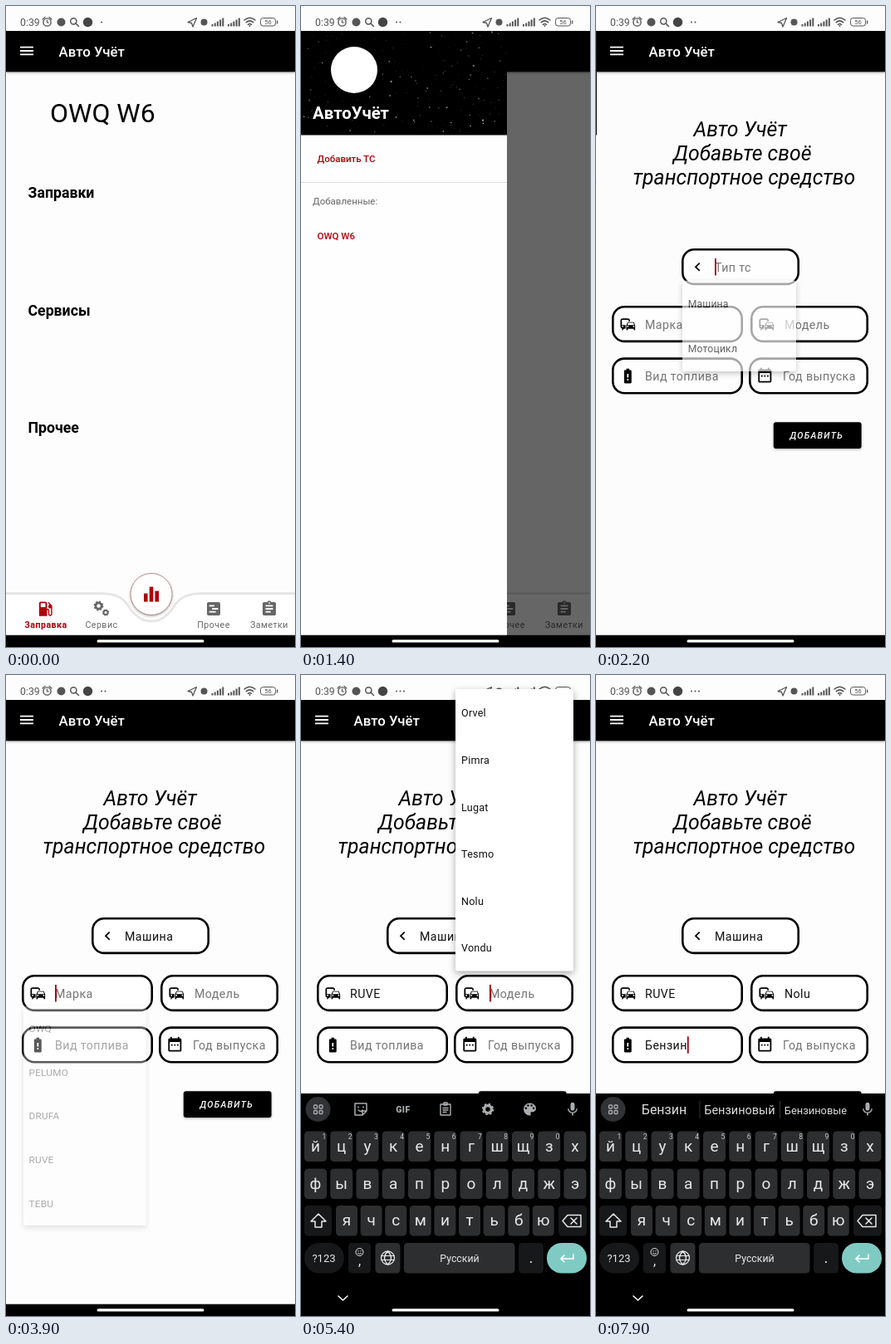
Write an HTML page that moves like this. It is 348 by 772 pixels and loops after 8 s.

```html
<!DOCTYPE html>
<html lang="ru">
<head>
<meta charset="utf-8">
<title>Авто Учёт</title>
<style>
  html, body { margin: 0; height: 100%; overflow: hidden; background: #fdfdfd; }
  svg { display: block; width: 100%; height: 100%; font-family: Roboto, sans-serif; }
  text { white-space: pre; }
  .line { fill: none; stroke-linecap: round; stroke-linejoin: round; }
  .popup { filter: drop-shadow(0 3px 4px #0005); }
  .raised { filter: drop-shadow(0 1px 1.5px #0005); }
</style>
</head>
<body>
<svg id="stage" viewBox="0 0 348 772"></svg>
<script>
const LOOP = 8000, STEP = 100, RED = '#b00009', GREY = '#666';
const CAR = 'OWQ W6', BRAND = 'RUVE', MODEL = 'Nolu', ROW = 56.6;

const ICONS = {
  menu: 'M3 18h18v-2H3zM3 13h18v-2H3zM3 6v2h18V6z',
  fuel: 'M19.77 7.23l-3.71-3.73L15 4.56l2.11 2.11c-.94.36-1.61 1.26-1.61 2.33 0 1.38 1.12 2.5 2.5 2.5.36 0 .69-.08 1-.21v7.21c0 .55-.45 1-1 1s-1-.45-1-1V14c0-1.1-.9-2-2-2h-1V5c0-1.1-.9-2-2-2H6c-1.1 0-2 .9-2 2v16h10v-7.5h1.5v5c0 1.38 1.12 2.5 2.5 2.5s2.5-1.12 2.5-2.5V9c0-.69-.28-1.32-.73-1.77zM12 10H6V5h6z',
  note: 'M5 3h14a2 2 0 0 1 2 2v14a2 2 0 0 1-2 2H5a2 2 0 0 1-2-2V5a2 2 0 0 1 2-2zM6 7v2h7V7zM10 11v2h8v-2zM6 15v2h9v-2z',
  clipboard: 'M19 3h-4.18C14.4 1.84 13.3 1 12 1s-2.4.84-2.82 2H5c-1.1 0-2 .9-2 2v14c0 1.1.9 2 2 2h14c1.1 0 2-.9 2-2V5c0-1.1-.9-2-2-2zm-7 0c.55 0 1 .45 1 1s-.45 1-1 1-1-.45-1-1 .45-1 1-1zm2 14H7v-2h7zm3-4H7v-2h10zm0-4H7V7h10z',
  back: 'M15.41 7.41L14 6l-6 6 6 6 1.41-1.41L10.83 12z',
  commute: 'M12 4H5C3.34 4 2 5.34 2 7v8c0 1.66 1.34 3 3 3l-1 1v1h1l2-2.03L9 18v-5H4V5.98L13 6v2h2V7c0-1.66-1.34-3-3-3zM5 14c.55 0 1 .45 1 1s-.45 1-1 1-1-.45-1-1 .45-1 1-1zm15.57-4.34c-.14-.4-.52-.66-.97-.66h-7.19c-.46 0-.83.26-.98.66L10 13.77l.01 5.51c0 .38.31.72.69.72h.62c.38 0 .68-.38.68-.76V18h8v1.24c0 .38.31.76.69.76h.61c.38 0 .69-.34.69-.72l.01-5.51zM12.41 10h7.19l1.03 3h-9.25zM12 16c-.55 0-1-.45-1-1s.45-1 1-1 1 .45 1 1-.45 1-1 1zm8 0c-.55 0-1-.45-1-1s.45-1 1-1 1 .45 1 1-.45 1-1 1z',
  battery: 'M15.67 4H14V2h-4v2H8.33C7.6 4 7 4.6 7 5.33v15.33C7 21.4 7.6 22 8.33 22h7.33c.74 0 1.34-.6 1.34-1.33V5.33C17 4.6 16.4 4 15.67 4zM13 18h-2v-2h2zm0-4h-2V9h2z',
  calendar: 'M19 3h-1V1h-2v2H8V1H6v2H5c-1.11 0-2 .9-2 2v14c0 1.1.89 2 2 2h14c1.1 0 2-.9 2-2V5c0-1.1-.9-2-2-2zm0 16H5V8h14zM9 11H7v2h2zM13 11h-2v2h2zM17 11h-2v2h2z',
  mic: 'M12 14c1.66 0 3-1.34 3-3V5c0-1.66-1.34-3-3-3S9 3.34 9 5v6c0 1.66 1.34 3 3 3zm5.3-3c0 3-2.54 5.1-5.3 5.1S6.7 14 6.7 11H5c0 3.41 2.72 6.23 6 6.72V21h2v-3.28c3.28-.48 6-3.3 6-6.72z',
  palette: 'M12 3a9 9 0 0 0 0 18c.83 0 1.5-.67 1.5-1.5 0-1-.9-1.3-.4-2.3.2-.7.8-1.2 1.4-1.2H16a5 5 0 0 0 5-5c0-4.4-4-8-9-8zM5 10.5a1.5 1.5 0 1 1 3 0 1.5 1.5 0 1 1-3 0zM8 6.5a1.5 1.5 0 1 1 3 0 1.5 1.5 0 1 1-3 0zM13 6.5a1.5 1.5 0 1 1 3 0 1.5 1.5 0 1 1-3 0zM16 10.5a1.5 1.5 0 1 1 3 0 1.5 1.5 0 1 1-3 0z'
};

const text = (x, y, size, str, attrs = '') => `<text x="${x}" y="${y}" font-size="${size}" ${attrs}>${str}</text>`;
const middle = (x, y, size, str, attrs = '') => text(x, y, size, str, `text-anchor="middle" ${attrs}`);
const rect = (x, y, w, h, fill, rx = 0, attrs = '') =>
  `<rect x="${x}" y="${y}" width="${w}" height="${h}" rx="${rx}" fill="${fill}" ${attrs}/>`;
const dot = (x, y, r, fill, attrs = '') => `<circle cx="${x}" cy="${y}" r="${r}" fill="${fill}" ${attrs}/>`;
const line = (d, color, width = 1.5) => `<path class="line" d="${d}" stroke="${color}" stroke-width="${width}"/>`;
const group = (id, body, attrs = '') => `<g id="${id}" ${attrs}>${body}</g>`;
const icon = (name, cx, cy, fill = '#000', size = 21.3) =>
  `<path transform="translate(${cx - size / 2} ${cy - size / 2}) scale(${size / 24})" fill="${fill}" fill-rule="evenodd" d="${ICONS[name]}"/>`;
const gear = (x, y, r, color) => {
  const teeth = r * 1.4;
  return dot(x, y, r, 'none', `stroke="${color}" stroke-width="${r * .75}"`) +
    dot(x, y, teeth, 'none', `stroke="${color}" stroke-width="${r * .5}" stroke-dasharray="${teeth * Math.PI / 8}"`);
};

function statusBar() {
  const ink = '#555';
  const signal = x => [2.5, 4, 6, 8, 10].map((h, i) => rect(x + i * 3.2, 24.5 - h, 2, h, ink)).join('');
  return rect(0, 0, 348, 30, '#fdfdfd') + text(17, 24, 12.3, '0:39', `fill="${ink}"`) +
    dot(49.5, 19.5, 4.6, 'none', `stroke="${ink}" stroke-width="1.4"`) +
    line('M49.5 17v3h2M44 16l3-2.5M55 16l-3-2.5', ink, 1.2) +
    dot(66.5, 19.5, 5, ink) +
    dot(81.3, 18.3, 3.6, 'none', `stroke="${ink}" stroke-width="1.5"`) + line('M84 21l3.5 3.5', ink) +
    dot(98.5, 19.5, 5.7, '#444') +
    [115, 119.5, 124].map((x, i) => dot(x, 19.5, 1, ink, `id="notice${i}"`)).join('') +
    line('M219 19.5L229.5 14.5 225 25 223.5 20.5z', ink, 1.3) +
    dot(238.5, 19.5, 4, ink) + signal(247.5) + signal(267) +
    line('M287 17q6.5-5.5 13 0M289.3 19.7q4.2-3.5 8.4 0M291.5 22.3q2-1.6 4 0', ink, 1.6) + dot(293.5, 24, 1, ink) +
    rect(306.5, 14.5, 18, 9.5, 'none', 3, `stroke="${ink}"`) + rect(326, 17.5, 1.3, 4, ink) +
    middle(315.5, 22.2, 7.5, '56', `fill="${ink}"`);
}

function homePage() {
  const heading = (y, str) => text(26.5, y, 17.7, str, 'font-weight="700"');
  const label = (x, str, attrs = `fill="${GREY}"`) => middle(x, 749, 10.6, str, `letter-spacing=".5" ${attrs}`);
  return rect(0, 30, 348, 728, '#fdfdfd') + text(53, 140, 32, CAR) +
    heading(231.2, 'Заправки') + heading(372.7, 'Сервисы') + heading(514.2, 'Прочее') +
    '<path d="M-9 707.5H112C132 707.5 140 712 147 722 155 735 164 741 175 741S195 735 203 722C210 712 218 707.5 238 707.5H357V770H-9z" fill="#fff" stroke="#e6e6e6" stroke-width="3"/>' +
    dot(175, 708.4, 25, '#fff', 'class="raised" stroke="#a66" stroke-width=".7"') +
    rect(166, 707.5, 4.6, 10, RED) + rect(172.7, 699.5, 4.6, 18, RED) + rect(179.4, 704.5, 4.6, 13, RED) +
    icon('fuel', 47.5, 726, RED, 23) + label(48, 'Заправка', `fill="${RED}" font-weight="700"`) +
    gear(111.5, 722.5, 3.6, GREY) + gear(120, 730.5, 2.5, GREY) + label(115, 'Сервис') +
    icon('note', 250, 726, GREY) + label(250, 'Прочее') +
    icon('clipboard', 317, 726, GREY) + label(317, 'Заметки');
}

const FIELDS = [
  { x: 103, y: 292, w: 142, icon: 'back', textX: 143, hint: 'Тип тс', value: 'Машина', at: 3100 },
  { x: 19, y: 361, w: 158, icon: 'commute', textX: 59, hint: 'Марка', value: BRAND, at: 4800 },
  { x: 186, y: 361, w: 142, icon: 'commute', textX: 227, hint: 'Модель', value: MODEL, at: 5800 },
  { x: 19, y: 423.3, w: 158, icon: 'battery', textX: 59, hint: 'Вид топлива', value: 'Бензин', at: 7800 },
  { x: 184, y: 423.3, w: 144, icon: 'calendar', textX: 225, hint: 'Год выпуска', at: Infinity }
];

// Field index and the span in which its caret is visible.
const CARETS = [
  [0, 2100, 2600], [0, 3100, 3500], [1, 3800, 4700], [1, 4800, 5100], [2, 5200, 5700],
  [2, 5800, 6400], [3, 6500, 6900], [3, 7400, 8000]
];

const BRANDS = ['OWQ', 'PELUMO', 'DRUFA', BRAND, 'TEBU'];
const POPUPS = [
  { x: 103, y: 330.7, w: 142, items: ['Машина', 'Мотоцикл'], open: 2070, close: 3000 },
  { x: 19, y: 398.5, w: 158, items: BRANDS, open: 3830, close: 4100 },
  { x: 19, y: 73, w: 158, items: BRANDS, open: 4180, close: 4700, up: true },
  { x: 186, y: 17, w: 142, items: ['Orvel', 'Pimra', 'Lugat', 'Tesmo', MODEL, 'Vondu'], open: 5100, close: 5750, up: true },
  { x: 19, y: 135, w: 158, items: ['Бензин', 'Дизель', 'Газ', 'Электро', 'Гибрид'], open: 6450, close: 7700, up: true }
];

function formPage() {
  const title = (x, y, str) => text(x, y, 24.8, str, 'font-style="italic"');
  const field = (f, i) =>
    rect(f.x + 1.3, f.y + 1.3, f.w - 2.6, 41.6, '#fff', 14, 'stroke="#000" stroke-width="2.6"') +
    icon(f.icon, f.x + 19.3, f.y + 22.3) +
    text(f.textX, f.y + 27.7, 14.2, f.hint, `id="field${i}" letter-spacing=".44"`);
  return rect(0, 30, 348, 728, '#fdfdfd') +
    title(117.5, 157.4, 'Авто Учёт') + title(93, 186.4, 'Добавьте своё') + title(44.5, 215.4, 'транспортное средство') +
    FIELDS.map(field).join('') + rect(0, 0, 1.8, 20.5, '#a0000c', 0, 'id="caret"') +
    rect(213.8, 501.3, 105.8, 31.8, '#000', 3, 'class="raised"') +
    text(233.5, 521.3, 10.6, 'ДОБАВИТЬ', 'fill="#fff" font-weight="500" font-style="italic" letter-spacing="1.25"');
}

function drawer() {
  let seed = 7;
  const random = () => (seed = seed * 16807 % 2147483647) / 2147483647;
  const specks = Array.from({ length: 230 }, () =>
    dot(random() * 248, 30 + random() * 125, .3 + random() ** 4 * .9, '#fff', `opacity="${.15 + random() * .45}"`)).join('');
  const link = (y, str) => text(19.5, y, 11.5, str, `fill="${RED}" font-weight="500"`);
  return rect(0, 30, 248, 728, '#fefefe') + rect(0, 30, 248, 125.5, '#000') + specks +
    dot(64, 77, 28, '#fff') +
    text(14, 136, 20.4, 'АвтоУчёт', 'fill="#fff" font-weight="700"') +
    link(188.3, 'Добавить ТС') + rect(0, 212, 248, 1, '#ddd') +
    text(14, 239, 11.5, 'Добавленные:', `fill="${GREY}"`) + link(281.3, CAR);
}

function popup(p, i) {
  const item = (str, n) =>
    text(p.x + 7, p.y + ROW * (n + .5) + 5, 12.6, str, 'fill="#111" letter-spacing=".22"');
  return group('popup' + i, rect(p.x, p.y, p.w, p.items.length * ROW, '#fff', 2) + p.items.map(item).join(''), 'class="popup"');
}

function keyboard() {
  const KEY = '#2d2e30', DARK = '#17181a', INK = '#e8e8e8', TOOL = '#aaadb0';
  const key = (x, y, w, label = '', fill = KEY) =>
    rect(x, y, w, 36.5, fill, 4.5) + middle(x + w / 2, y + 24, 19, label, `fill="${INK}"`);
  const row = (letters, x, y, pitch, w) => [...letters].map((c, i) => key(x + i * pitch, y, w, c)).join('');
  const digits = [...'1234567890'].map((d, i) => middle(28 + i * 31.25, 559, 8.5, d, 'fill="#ccc"')).join('');
  const grid = [15.5, 22].map(x => [518, 524.5].map(y =>
    rect(x, y, 4, 4, 'none', 1, `stroke="${TOOL}" stroke-width="1.3"`)).join('')).join('');
  const tools = line('M65 516h14v9l-5 5H65zM79 525h-5v5M69 520v1M75 520v1M69 524q3 3 5 0', TOOL) +
    middle(123, 527, 10.5, 'GIF', `fill="${TOOL}" font-weight="900" letter-spacing=".5"`) +
    line('M168 517h12v13h-12zM172 515h4v3h-4zM171 521.5h6M171 524h6M171 526.5h4', TOOL, 1.4) +
    gear(225, 523, 4.4, TOOL) + icon('palette', 275.5, 523, TOOL, 20);
  const hints = middle(82, 529, 16, 'Бензин', 'fill="#ddd"') + middle(173, 529, 14.5, 'Бензиновый', 'fill="#ddd"') +
    middle(264.5, 529, 12.9, 'Бензиновые', 'fill="#ddd"') + rect(124.5, 513, 1, 21, '#333') + rect(221, 513, 1, 21, '#333');
  return rect(0, 504, 348, 268, '#000') + dot(20.5, 523, 15, '#303235') + grid +
    group('tools', tools) + group('hints', hints) + icon('mic', 327, 523, TOOL, 20) +
    row('йцукенгшщзх', 4, 549.5, 31.25, 27) + digits +
    row('фывапролджэ', 4, 594.5, 31.25, 27) +
    key(4, 639, 33, '', DARK) + line('M21 649l-9 9h5v7h8v-7h5z', INK) +
    row('ячсмитьбю', 42, 639, 29.6, 26) +
    key(310, 639, 34, '', DARK) + line('M315 657.5l6-7h16v14h-16zM325 654l7 7M332 654l-7 7', INK) +
    rect(4, 684, 48, 36.5, DARK, 18) + middle(27.5, 706.5, 13, '?123', `fill="${INK}"`) +
    key(57, 684, 27, '', DARK) + dot(70.5, 695, 4.5, 'none', `stroke="${INK}"`) +
    line('M69 693.5v.5M72 693.5v.5M68.5 696.5q2 2 4 0', INK, 1) + middle(70.5, 711, 16, ',', `fill="${INK}"`) +
    key(89.5, 684, 30) + dot(104.5, 702, 8, 'none', `stroke="${INK}" stroke-width="1.3"`) +
    line('M104.5 694q-8 8 0 16q8-8 0-16M97 699.5h15M97 704.5h15', INK, 1.2) +
    key(124, 684, 133.5) + middle(191, 706.5, 12.3, 'Русский', `fill="${INK}"`) +
    key(262, 684, 30, '.', DARK) +
    rect(296, 684, 48, 36.5, '#7fcbc4', 18) + line('M328 698v5h-15M317 699l-4 4 4 4', '#fff', 1.7) +
    line('M45 748l5.5 5 5.5-5', '#fff', 1.6);
}

const stage = document.getElementById('stage');
stage.innerHTML =
  group('home', homePage()) + group('form', formPage()) +
  rect(0, 30, 348, 49.3, '#000', 0, 'class="raised"') + icon('menu', 25, 54, '#fff') +
  text(63.5, 61.1, 16.8, 'Авто Учёт', 'fill="#fff" font-weight="500"') +
  rect(0, 30, 348, 728, '#000', 0, 'id="scrim"') + group('drawer', drawer()) +
  statusBar() + rect(0, 757.7, 348, 15, '#000') +
  POPUPS.map(popup).join('') + group('keyboard', keyboard()) +
  rect(109.5, 763.3, 129, 3.2, '#fff', 1.6);

const el = id => document.getElementById(id);
const show = (id, on) => el(id).setAttribute('visibility', on ? 'visible' : 'hidden');
const ramp = (t, from, span) => Math.max(0, Math.min(1, (t - from) / span));
const easeOut = (t, from, span) => 1 - (1 - ramp(t, from, span)) ** 3;

function draw(t) {
  const formOpen = t >= 2000;
  show('home', !formOpen);
  show('form', formOpen);

  const slide = easeOut(t, 870, 500) * (1 - easeOut(t, 1870, 390));
  el('drawer').setAttribute('transform', `translate(${-248 * (1 - slide)} 0)`);
  show('drawer', slide > 0);
  el('scrim').setAttribute('opacity', .6 * slide);

  show('notice1', t >= 100);
  show('notice2', t >= 4300);

  FIELDS.forEach((f, i) => {
    const filled = t >= f.at, label = el('field' + i);
    label.textContent = filled ? f.value : f.hint;
    label.setAttribute('fill', filled ? '#111' : '#757575');
  });
  const caret = CARETS.find(([, from, to]) => t >= from && t < to);
  show('caret', caret);
  if (caret) {
    const i = caret[0], f = FIELDS[i];
    const width = t >= f.at ? el('field' + i).getComputedTextLength() : 0;
    el('caret').setAttribute('transform', `translate(${f.textX + width} ${f.y + 12})`);
  }

  POPUPS.forEach((p, i) => {
    const grow = ramp(t, p.open, 200), alpha = grow * (1 - ramp(t, p.close, 200));
    const scale = .9 + .1 * grow, px = p.x + p.w * .2, py = p.y + (p.up ? p.items.length * ROW : 0);
    const node = el('popup' + i);
    node.setAttribute('opacity', alpha);
    node.setAttribute('transform', `translate(${px} ${py}) scale(${scale}) translate(${-px} ${-py})`);
    show('popup' + i, alpha > 0);
  });

  const raised = easeOut(t, 3900, 400);
  el('keyboard').setAttribute('transform', `translate(0 ${268 * (1 - raised)})`);
  show('keyboard', raised > 0);
  const suggesting = t >= 7800;
  el('tools').setAttribute('opacity', suggesting ? 0 : 1);
  el('hints').setAttribute('opacity', suggesting ? 1 : 0);
}

const start = performance.now();
function tick() {
  const t = (performance.now() - start) % LOOP;
  draw(Math.floor(t / STEP) * STEP);
  requestAnimationFrame(tick);
}
tick();
</script>
</body>
</html>
```
